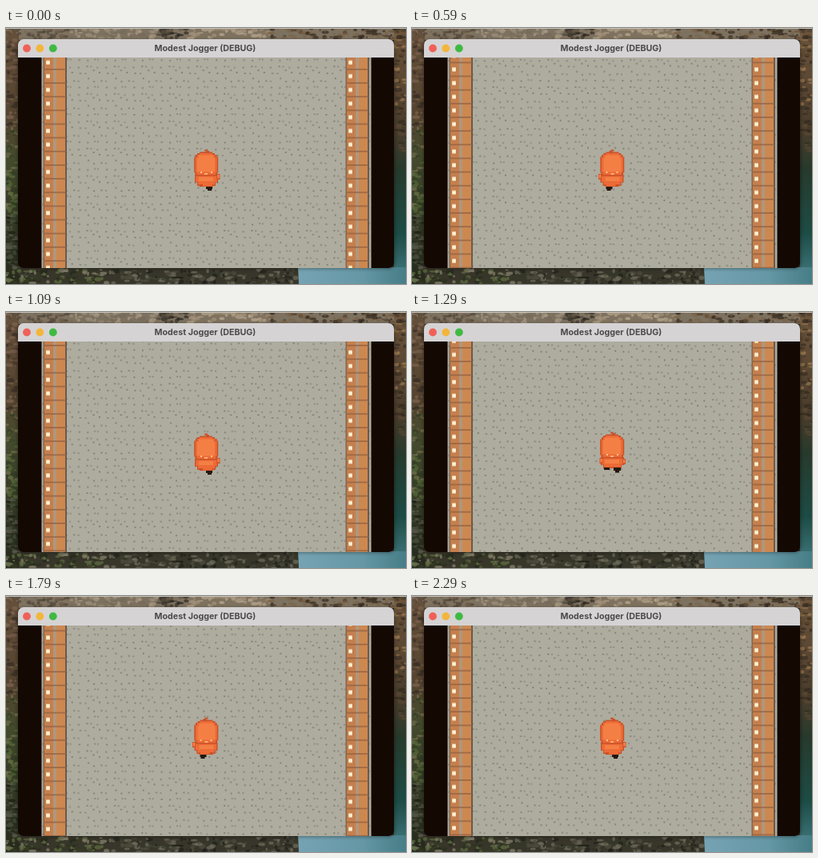
These frames come from a looping animation (500 by 321 pixels, 2390 ms). An HTML page:

```html
<!DOCTYPE html>
<html lang="en">
<head>
<meta charset="utf-8">
<title>Modest Jogger</title>
<style>
  html, body { margin: 0; width: 100%; height: 100%; overflow: hidden; background: #2b2a24; }
  svg { display: block; width: 500px; height: 321px; }
  text { font: 700 10.7px Inter, "Liberation Sans", sans-serif; fill: #4b494a; }
</style>
</head>
<body>
<svg viewBox="0 0 500 321" xmlns="http://www.w3.org/2000/svg">
  <defs>
    <linearGradient id="water" x2="1">
      <stop offset="0" stop-color="#76a3b3"/>
      <stop offset=".6" stop-color="#6597a5"/>
      <stop offset="1" stop-color="#467d86"/>
    </linearGradient>
    <linearGradient id="shore" x2="0" y2="1">
      <stop offset="0" stop-color="#6d553c"/>
      <stop offset=".4" stop-color="#4a3c2c"/>
      <stop offset=".55" stop-color="#273a2c"/>
      <stop offset=".8" stop-color="#1d4c45"/>
      <stop offset="1" stop-color="#467d86"/>
    </linearGradient>
    <linearGradient id="slope" x2="0" y2="1">
      <stop offset="0" stop-color="#65503b"/>
      <stop offset=".35" stop-color="#54442f"/>
      <stop offset=".5" stop-color="#444b2d"/>
      <stop offset="1" stop-color="#26291c"/>
    </linearGradient>
    <clipPath id="window"><rect x="15" y="14" width="470" height="287" rx="7"/></clipPath>
    <filter id="soft"><feGaussianBlur stdDeviation=".5"/></filter>
    <filter id="shadow" x="-10%" y="-10%" width="120%" height="120%"><feGaussianBlur stdDeviation="2"/></filter>
    <pattern id="floor" width="34.3" height="34.3" patternUnits="userSpaceOnUse"></pattern>
    <pattern id="rail" width="378" height="17.15" patternUnits="userSpaceOnUse"></pattern>
  </defs>
  <g id="scenery"></g>
  <rect x="14" y="15" width="472" height="287" rx="8" opacity=".35" filter="url(#shadow)"/>
  <g clip-path="url(#window)">
    <rect x="15" y="14" width="470" height="23" fill="#d5d3d4"/>
    <circle cx="26" cy="25.5" r="4.9" fill="#ef6158"/>
    <circle cx="42.3" cy="25.5" r="4.9" fill="#f2b63d"/>
    <circle cx="58.8" cy="25.5" r="4.9" fill="#3fb944"/>
    <text x="249" y="29" text-anchor="middle">Modest Jogger (DEBUG)</text>
    <rect x="15" y="37" width="470" height="264" fill="#140803"/>
    <rect x="44.5" y="37" width="412" height="264" fill="#aeac9f"/>
    <rect x="44.5" y="37" width="412" height="264" fill="url(#floor)"/>
    <rect x="46" y="37" width="31" height="264" fill="url(#rail)"/>
    <rect x="424" y="37" width="31" height="264" fill="url(#rail)"/>
    <g id="runner"></g>
  </g>
</svg>
<script>
const $ = id => document.getElementById(id);
const rect = (x, y, w, h, fill) =>
  `<rect x="${x}" y="${y}" width="${w}" height="${h}" fill="${fill}"/>`;

function randomFrom(seed) {
  return () => (seed = (seed * 16807) % 2147483647) / 2147483647;
}

// Rocky texture: small soft blobs scattered over a box
const rand = randomFrom(77);
function rocks(x, y, w, h, count, colors) {
  let out = '';
  for (let i = 0; i < count; i++) {
    const color = colors[Math.floor(rand() * colors.length)];
    out += `<ellipse cx="${x + rand() * w}" cy="${y + rand() * h}" rx="${1 + rand() * 4}"
      ry="${.8 + rand() * 2}" fill="${color}" opacity=".7"/>`;
  }
  return out;
}

$('scenery').innerHTML =
  rect(0, 0, 500, 321, '#38362a') +
  rect(0, 0, 500, 15, '#7d715f') +
  rect(0, 0, 16, 321, 'url(#slope)') +
  rect(485, 0, 15, 321, 'url(#shore)') +
  '<g filter="url(#soft)">' +
  rocks(0, 0, 80, 13, 60, ['#4b4337', '#857461', '#6a5b48']) +
  rocks(80, 0, 110, 13, 80, ['#9a8d7b', '#756b5b', '#a89a83']) +
  rocks(190, 0, 40, 13, 35, ['#3b352b', '#5c5141', '#2c2822']) +
  rocks(230, 0, 100, 13, 70, ['#a3917a', '#85745d', '#b5a58c']) +
  rocks(330, 0, 170, 13, 100, ['#7b6248', '#4b3d2e', '#33291f']) +
  rocks(0, 14, 14, 110, 60, ['#7e6450', '#503d2f', '#352b23']) +
  rocks(0, 125, 14, 110, 65, ['#55683a', '#2f3b22', '#75704c']) +
  rocks(0, 235, 14, 66, 40, ['#1c2016', '#46503a', '#5d5b4e']) +
  rocks(487, 14, 13, 85, 45, ['#97774f', '#5d4731', '#3a2f24']) +
  rocks(487, 99, 13, 55, 30, ['#584732', '#32291e', '#413a28']) +
  rocks(0, 303, 130, 18, 110, ['#5f6d42', '#23291b', '#8a8470', '#343b24']) +
  rocks(130, 303, 232, 18, 190, ['#4d4c3d', '#1f211b', '#716e5c', '#34382a']) +
  '</g>' +
  rect(0, 0, 500, 1, '#c6c2ba') +
  '<path d="M365 300H500V321H366Z" fill="url(#water)"/>';

// Speckles on a jittered 4 x 4 grid, so they stay evenly spread
const jitter = randomFrom(4127);
let specks = '';
for (let i = 0; i < 16; i++) {
  const x = (i % 4) * 8.57 + jitter() * 6.5;
  const y = Math.floor(i / 4) * 8.57 + jitter() * 6.5;
  specks += rect(x, y, 1.9, 1.7, i % 3 ? '#77776e' : '#85847a');
}
$('floor').innerHTML = specks;

// One tile holds the strip for both sides, since they repeat 378 px apart
const lamp = y => rect(49.5, y - 2.9, 6, 5.8, '#b06c3d') + rect(50.1, y - 2.5, 4.8, 5, '#fff0cf');
$('rail').innerHTML =
  rect(46.5, 0, 1.5, 17.15, '#7d6652') +
  rect(48, 0, 11, 17.15, '#c67f4c') +
  rect(59, 0, 4, 17.15, '#ae977f') +
  rect(63, 0, 11, 17.15, '#cd8850') +
  rect(74, 0, 2, 17.15, '#6d594b') +
  rect(47, 7.8, 28, 1.5, '#946343') +
  lamp(0) + lamp(17.15);

const EDGE = '#ca5128', COAT = '#ec6b36', LIGHT = '#f47f45', BOOT = '#24170f';

const head =
  rect(248, 150.5, 4, 2, EDGE) + rect(250, 152, 4, 2, EDGE) +
  rect(242, 153.5, 16, 2, EDGE) + rect(239, 155, 22, 2.5, EDGE) +
  rect(237, 157, 26.5, 3, EDGE) + rect(235.2, 159.5, 30, 20, EDGE) +
  rect(236.5, 179, 27.5, 4, EDGE) +
  rect(242, 155, 16, 2.5, COAT) + rect(239, 157, 22.5, 3, COAT) +
  rect(236.7, 160, 27, 19, COAT) + rect(238.5, 178, 23.5, 4, COAT) +
  rect(241, 157.5, 18, 21, LIGHT) + rect(239, 161, 22, 17, LIGHT) +
  rect(243, 178, 2, 2, '#ffc28f') + rect(256, 178, 2, 2, '#ffc28f') +
  rect(248, 180, 4, 2, '#ffad73');

const torso =
  rect(236, 182, 29, 10, EDGE) + rect(237.3, 183.5, 26.4, 8, COAT) +
  rect(239, 191, 23, 5, EDGE) + rect(240, 190, 21, 4.5, COAT) +
  rect(241, 185, 18, 5, LIGHT);

const hand = (x, y) => rect(x, y, 4, 7, EDGE) + rect(x + .8, y + 1, 2.5, 4.5, LIGHT);

const stride = `<g transform="translate(0 2)">${head}${torso}
  ${hand(263.5, 181)}${rect(242, 194, 17, 3, EDGE)}${rect(246, 194, 12, 2.5, COAT)}
  ${rect(250, 197, 8, 3, BOOT)}${rect(252, 200, 5, 2, BOOT)}</g>`;

const landing = head + torso + hand(263, 184) + hand(234.5, 183) +
  rect(240, 195, 7, 3, BOOT) + rect(252, 195, 9, 4, BOOT) + rect(254, 199, 5, 2.5, BOOT);

const passing = head + torso + hand(233.5, 183) + hand(262.5, 183) +
  rect(240, 195, 8, 4, BOOT) + rect(239, 198, 6, 2.5, BOOT) +
  rect(253, 195, 7, 4, BOOT);

const mirror = pose => `<g transform="matrix(-1 0 0 1 500.5 0)">${pose}</g>`;
const poses = [stride, landing, passing, mirror(stride), mirror(landing), mirror(passing)];
$('runner').innerHTML = poses.map(pose => `<g>${pose}</g>`).join('');
const poseNodes = [...$('runner').children];

const LOOP = 2390;
const PACE = 10.02; // px per step

function render(time) {
  const step = Math.min(23, Math.floor((time % LOOP + 10) / 100));
  const y = 43.3 + step * PACE;
  $('floor').setAttribute('patternTransform', `translate(44.5 ${y})`);
  $('rail').setAttribute('patternTransform', `translate(0 ${y})`);
  const active = Math.floor((step + 1) / 2) % poses.length;
  poseNodes.forEach((node, i) => node.setAttribute('display', i === active ? 'inline' : 'none'));
}

const start = performance.now();
function tick() {
  render(performance.now() - start);
  requestAnimationFrame(tick);
}
tick();
</script>
</body>
</html>
```
